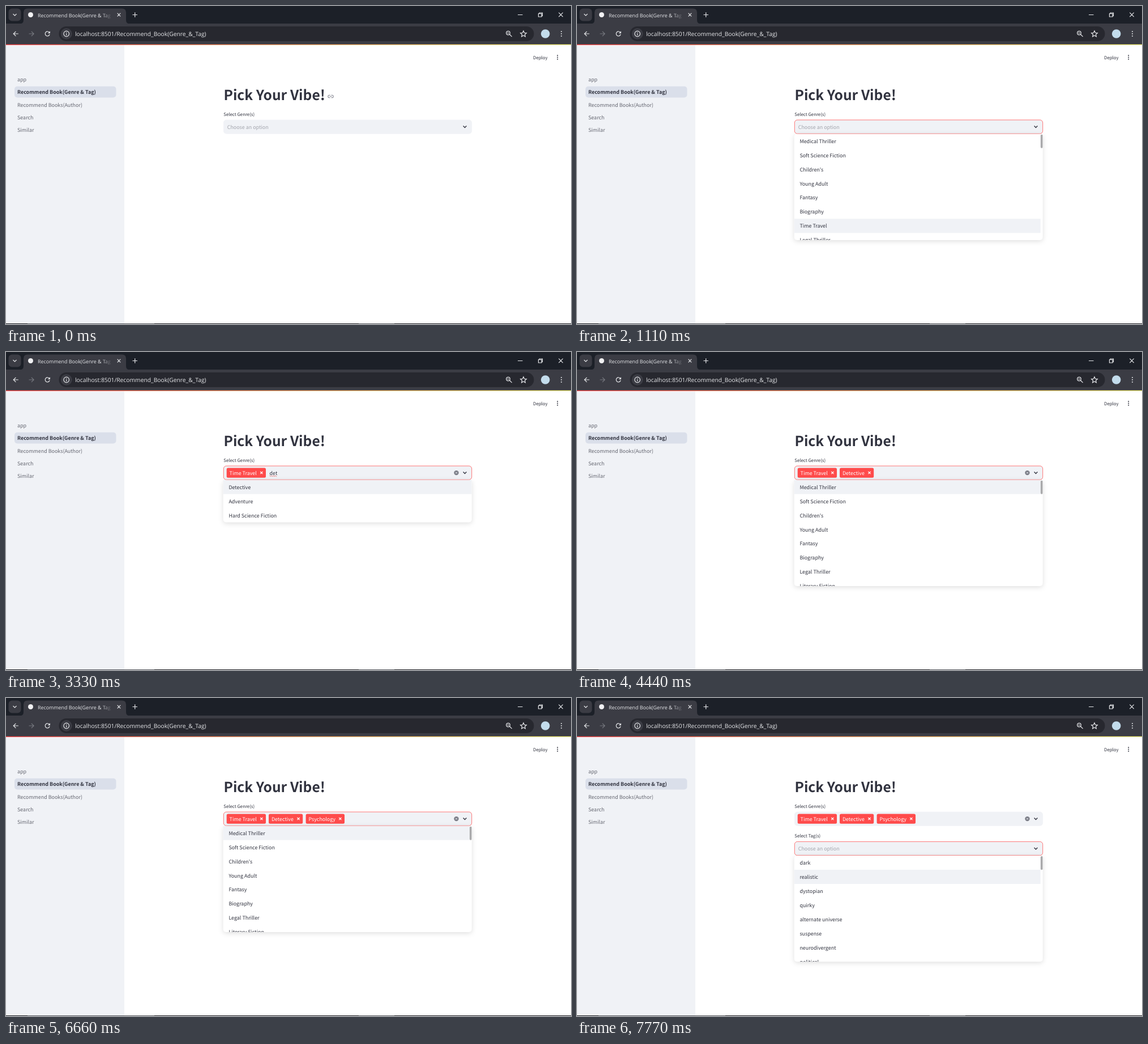
Animation, 998 px wide and 561 px high, one loop 8 s. Source, as an HTML page:

```html
<!DOCTYPE html>
<html lang="en">
<head>
<meta charset="utf-8">
<title>Genre picker</title>
<style>
html, body { margin: 0; width: 100%; height: 100%; overflow: hidden; background: #fff; }
svg { display: block; }
#stage { width: 998px; height: 561px; }
text {
  font: 8.94px "Noto Sans CJK JP", "Noto Sans CJK SC", "Noto Sans CJK", sans-serif;
  fill: #31333f; text-rendering: geometricPrecision; white-space: pre;
}
.chrome text { font-family: "Open Sans", "Noto Sans", sans-serif; fill: #e6e7ea; }
text.small { font-size: 7.82px; }
text.title { font-size: 24.58px; font-weight: 700; }
text.nav { fill: #646670; }
text.current { fill: #31333f; font-weight: 600; }
text.hint { fill: #a2a4ac; }
text.chip { fill: #fff; }
.line { fill: none; stroke: #e6e7ea; stroke-width: 1.2; }
.dark { fill: none; stroke: #31333f; stroke-width: 1.4; }
.menu { filter: drop-shadow(0 2.5px 4px rgba(0, 0, 0, .13)); }
.scene { visibility: hidden; animation: turn 8s step-end infinite; }
.scene.brief { animation-name: brief; }
@keyframes turn { 0% { visibility: visible; } 13.875%, 100% { visibility: hidden; } }
@keyframes brief { 0% { visibility: visible; } 2.875%, 100% { visibility: hidden; } }
</style>
</head>
<body>
<svg id="stage" viewBox="0 0 998 561">
  <defs>
    <linearGradient id="strip"><stop stop-color="#ff4b4b"/><stop offset="1" stop-color="#fffd80"/></linearGradient>
    <linearGradient id="fade"><stop stop-color="#3b3c44" stop-opacity="0"/><stop offset="1" stop-color="#3b3c44"/></linearGradient>
  </defs>

  <g class="chrome">
    <rect width="998" height="32" fill="#1c2028"/>
    <rect y="31" width="998" height="37" fill="#3b3c44"/>
    <rect x="4.500" y="4.500" width="22" height="22" rx="6" fill="#3b3c44"/>
    <path class="line" d="M12.500 14l3 3 3-3"/>
    <path fill="#3b3c44" d="M24 31.500q7 0 7-7V11.500q0-7 7-7h167q7 0 7 7v13q0 7 7 7z"/>
    <circle cx="43.500" cy="15.500" r="4.500" fill="#f1f1f3"/>
    <text x="56" y="19.500" style="font-size:8.9px">Recommend Book(Genre &amp; Tag</text>
    <rect x="168" y="8" width="20" height="17" fill="url(#fade)"/>
    <path class="line" d="M196.700 12.700l5.600 5.600m0-5.600l-5.600 5.600M223.500 15.500h8.500m-4.250-4.250v8.500"/>
    <path class="line" d="M904 15.500h8.500M940.500 13.500h5.500v5.500h-5.500zM942 13.500v-1.500h5.500v5.500h-1.500M976.300 11.700l7.400 7.400m0-7.400l-7.400 7.400"/>
    <path class="line" d="M21.800 49h-8.600m4.200-4.200L13.200 49l4.200 4.200"/>
    <path class="line" style="stroke:#777980" d="M40.500 49h8.600m-4.200-4.200L49.100 49l-4.200 4.200"/>
    <path class="line" d="M76.600 46.800a4 4 0 1 0 .5 3.200M77.300 44.800v2.800h-2.800"/>
    <rect x="93.500" y="36" width="839" height="26" rx="13" fill="#27282f"/>
    <circle cx="106.700" cy="49" r="10" fill="#3b3c44"/>
    <circle class="line" cx="106.700" cy="49" r="4.800"/>
    <path class="line" d="M106.700 48.400v3.300M106.700 46.200v1.200"/>
    <text x="122" y="52.800" style="font-size:10.31px">localhost:8501/Recommend_Book(Genre_&amp;_Tag)</text>
    <circle class="line" cx="887" cy="47.600" r="3.300"/>
    <path class="line" d="M889.400 50l4.200 4.200M885.400 47.600h3.200"/>
    <path id="star" class="line"/>
    <circle cx="952.700" cy="49" r="7.800" fill="#c3dcec"/>
    <path d="M981 45v0M981 49v0M981 53v0" stroke="#e6e7ea" stroke-width="2" stroke-linecap="round"/>
  </g>

  <rect y="68" width="209" height="492" fill="#f0f2f6"/>
  <rect y="67.700" width="998" height="1.300" fill="url(#strip)"/>
  <rect x="15" y="141.700" width="179.500" height="19.800" rx="5" fill="#dadfea"/>
  <g id="nav"></g>
  <text class="small" x="931" y="93.700">Deploy</text>
  <path d="M974.200 87.300v0M974.200 90.500v0M974.200 93.700v0" stroke="#31333f" stroke-width="2" stroke-linecap="round"/>
  <text class="title" x="384.500" y="166.300">Pick Your Vibe!</text>
  <text class="small" x="384.300" y="193.700">Select Genre(s)</text>
  <g id="scenes"></g>
  <path d="M0 560.500h998" stroke="#17181c"/>
  <path d="M38 560.500h224M623 560.500h63" stroke="#55575c"/>
</svg>

<script>
const LEFT = 384, WIDTH = 439, ROW = 24.95, STEP = 1110, LOOP = 8000;
const byId = id => document.getElementById(id);
const label = (x, y, str, cls = "") => `<text class="${cls}" x="${x}" y="${y}">${str}</text>`;
const cross = (x, y, r, color, w) =>
  `<path d="M${x - r} ${y - r}l${2 * r} ${2 * r}m0 ${-2 * r}l${-2 * r} ${2 * r}" stroke="${color}" stroke-width="${w}"/>`;

// Each chip: text, left edge, width
const CHIPS = [["Time Travel", 389.700, 69.300], ["Detective", 464, 60.200], ["Psychology", 529.600, 68.400]];
const GENRES = ["Medical Thriller", "Soft Science Fiction", "Children's", "Young Adult",
  "Fantasy", "Biography", "Legal Thriller", "Literary Fiction"];
const TAGS = ["dark", "realistic", "dystopian", "quirky", "alternate universe",
  "suspense", "neurodivergent", "political"];

function chip([name, x, w], y) {
  return `<rect x="${x}" y="${y - 8.600}" width="${w}" height="17.300" rx="2.500" fill="#ff4b4b"/>`
    + label(x + 4.900, y + 3.500, name, "chip") + cross(x + w - 7.700, y, 2.100, "#fff", 1.200);
}

function typedText(str, x, y) {
  const waves = "q.8 -1.600 1.600 0t1.600 0".repeat(4);
  return label(x, y + 3.500, str) + `<path d="M${x} ${y + 5.800}${waves}" fill="none" stroke="#e0403c" stroke-width=".7"/>`;
}

function field({ top, chips = 0, typed = "", focus = false }) {
  const y = top + 12.400;
  const end = chips ? CHIPS[chips - 1][1] + CHIPS[chips - 1][2] : LEFT;
  return `<rect x="${LEFT + .3}" y="${top + .3}" width="${WIDTH - .6}" height="24.300" rx="5" fill="#f0f2f6"
      stroke="${focus ? "#ff4b4b" : "#f0f2f6"}" stroke-width=".75"/>`
    + CHIPS.slice(0, chips).map(c => chip(c, y)).join("")
    + (chips ? "" : label(390.700, y + 3.500, "Choose an option", "hint"))
    + (typed && typedText(typed, end + 6.500, y))
    + (chips ? `<circle cx="795.500" cy="${y}" r="4.200" fill="#7b7d87"/>` + cross(795.500, y, 1.400, "#f0f2f6", 1) : "")
    + `<path class="dark" d="M807.600 ${y - 1.500}l2.900 2.900 2.900-2.900"/>`;
}

function menu(top, items, active) {
  const long = items.length > 7;
  const h = long ? 187.200 : items.length * ROW;
  const rows = items.map((item, i) => label(9.700, i * ROW + 16, item)).join("");
  return `<rect class="menu" x="${LEFT - .3}" y="${top}" width="${WIDTH}" height="${h}" rx="5" fill="#fff"/>
    <svg x="${LEFT - .3}" y="${top}" width="${WIDTH}" height="${h}" overflow="hidden">
      <rect y="${active * ROW}" width="${long ? WIDTH - 4 : WIDTH}" height="${ROW}" fill="#f0f2f6"/>${rows}
      ${long ? `<rect x="${WIDTH - 3.800}" y="1" width="3.800" height="24" rx="1.900" fill="#a9a9ab"/>` : ""}
    </svg>`;
}

const genreField = opts => field({ top: 200.700, ...opts });
const picking = (chips, typed, items, active = 0) =>
  genreField({ chips, typed, focus: true }) + menu(225.700, items, active);
const unpicked = [...GENRES.slice(0, 6), "Time Travel", "Legal Thriller"];
const linkIcon = `<path fill="none" stroke="#8b8d97" stroke-width="1.100"
  d="M572.700 157.200h-1.600a2.300 2.300 0 0 0 0 4.600h1.600m1.600-4.600h1.600a2.300 2.300 0 0 1 0 4.600h-1.600M571.500 159.500h4"/>`;

const scenes = [
  linkIcon + genreField({}),
  picking(0, "", unpicked, 6),
  picking(1, "", GENRES, 6),
  picking(1, "det", ["Detective", "Adventure", "Hard Science Fiction"]),
  picking(2, "", GENRES),
  picking(2, "psy", ["Psychology", "Psychological Thriller"]),
  picking(3, "", GENRES),
  genreField({ chips: 3 }) + label(384.300, 246, "Select Tag(s)", "small")
    + field({ top: 253.100, focus: true }) + menu(278.100, TAGS, 1)
];

byId("scenes").innerHTML = scenes.map((art, i) => {
  const brief = i === scenes.length - 1 ? " brief" : "";
  return `<g class="scene${brief}" style="animation-delay:${i ? i * STEP - LOOP : 0}ms">${art}</g>`;
}).join("");

byId("nav").innerHTML = ["app", "Recommend Book(Genre &amp; Tag)", "Recommend Books(Author)", "Search", "Similar"]
  .map((name, i) => label(20, 132.700 + i * 22.400, name, i === 1 ? "nav current" : "nav")).join("");

byId("star").setAttribute("d", "M" + Array.from({ length: 10 }, (_, i) => {
  const r = i % 2 ? 2.600 : 5.600, a = i * Math.PI / 5;
  return `${914 + r * Math.sin(a)} ${49.400 - r * Math.cos(a)}`;
}).join("L") + "Z");
</script>
</body>
</html>
```
